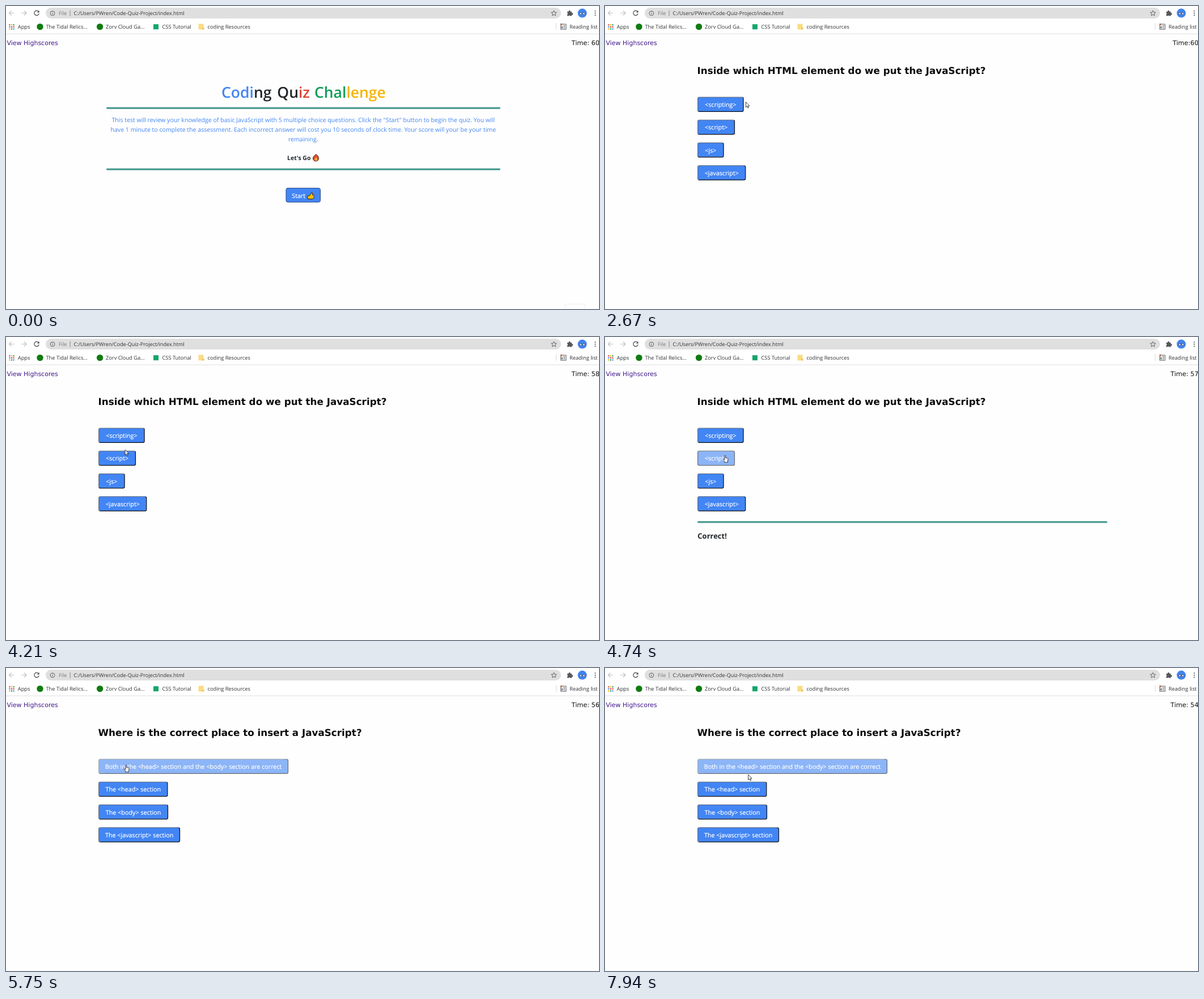
Animation of 1046x535 px, one loop 8000 ms. Source, as an HTML page:

```html
<!DOCTYPE html>
<html lang="en">
<head>
<meta charset="utf-8">
<title>Coding Quiz Challenge</title>
<style>
  html, body { margin: 0; width: 100%; height: 100%; overflow: hidden; background: #fff; }
  svg { display: block; width: 100%; height: 100%; }
  text { font-family: "Open Sans", "Noto Sans", sans-serif; text-rendering: geometricPrecision; white-space: pre; }
  .bar text { font-size: 9.25px; fill: #303236; }
  .bar .url { font-size: 9.1px; }
  .v text, text.v { font-family: "DejaVu Sans", sans-serif; }
  .mid { text-anchor: middle; }
  .intro { font-size: 10.6px; fill: #4285f4; }
  .label { font-size: 10.77px; fill: #fff; stroke: #fff; stroke-width: 0.2; text-anchor: middle; }
  .icon { fill: none; stroke: #5f6368; stroke-width: 1.2; }
</style>
</head>
<body>
<svg id="stage" viewBox="0 0 1046 535" preserveAspectRatio="none"></svg>
<script>
const LOOP = 8000;
const stage = document.getElementById('stage');

const esc = s => s.replace(/&/g, '&amp;').replace(/</g, '&lt;').replace(/>/g, '&gt;');
const text = (x, y, s, attrs = '') => `<text x="${x}" y="${y}" ${attrs}>${esc(s)}</text>`;
const rect = (x, y, w, h, attrs) => `<rect x="${x}" y="${y}" width="${w}" height="${h}" ${attrs}/>`;
const circle = (x, y, r, attrs) => `<circle cx="${x}" cy="${y}" r="${r}" ${attrs}/>`;
const path = (d, attrs) => `<path d="${d}" ${attrs}/>`;
const rule = (x, y, w) => rect(x, y, w, 2, 'rx="0.8" fill="#4fb8ab" stroke="#28756e" stroke-width="0.9"');

const appDots = () => {
  const tint = ['#db4437', '#4285f4', '#0f9d58', '#f4b400'];
  let out = '';
  for (let i = 0; i < 9; i++)
    out += rect(5.3 + i % 3 * 3.6, 32.2 + Math.floor(i / 3) * 3.6, 2.2, 2.2, `fill="${tint[(i * 3 + (i > 4)) % 4]}"`);
  return out;
};

const starPoints = (cx, cy, r) => Array.from({ length: 10 }, (_, i) => {
  const a = i * Math.PI / 5, d = i % 2 ? r * 0.45 : r;
  return (cx + d * Math.sin(a)).toFixed(2) + ',' + (cy - d * Math.cos(a)).toFixed(2);
}).join(' ');

const browser = `<g class="bar">
  ${rect(0, 0, 1046, 49, 'fill="#fff"')}
  ${rect(70, 3, 909, 19, 'rx="9.5" fill="#dfdfdf"')}
  ${path('M14.5 12.5H5.5M9.5 8.5L5.5 12.5L9.5 16.5M27 12.5H36M32 8.5L36 12.5L32 16.5', 'class="icon" style="stroke:#bfc1c4"')}
  ${path('M57.3 9.6A4.2 4.2 0 1 0 58.2 13.4', 'class="icon" style="stroke:#45484c"')}
  ${path('M58.6 7.8V11.6H54.8Z', 'fill="#45484c"')}
  ${circle(82, 12.8, 4, 'class="icon" style="stroke-width:1"')}
  ${path('M82 12.2V15M82 10.3V11.3', 'class="icon" style="stroke-width:1"')}
  ${text(93, 16, 'File', 'class="url" style="fill:#77797d"')}
  ${rect(112.6, 7.5, 1, 10.5, 'fill="#8a8c90"')}
  ${text(119.5, 16, 'C:/Users/PWren/Code-Quiz-Project/index.html', 'class="url"')}
  <polygon points="${starPoints(966.5, 12.9, 5)}" class="icon" style="stroke-width:1"/>
  ${path('M990 10H992.4A1.7 1.7 0 1 1 995.6 10H998V12.4A1.7 1.7 0 1 1 998 15.6V17.6H995.2A1.6 1.6 0 0 0 992.4 17.6H990V14.9A1.6 1.6 0 0 0 990 12Z', 'fill="#55585c"')}
  ${circle(1016.5, 12.6, 8, 'fill="#4384ee"')}
  ${[1013.8, 1019.2].map(x => circle(x, 13.4, 1.9, 'fill="#e4ebf8" stroke="#26365c" stroke-width="0.8"')).join('')}
  ${[9, 12.7, 16.4].map(y => circle(1039.4, y, 1.1, 'fill="#5f6368"')).join('')}
  ${appDots()}
  ${text(20.8, 40, 'Apps')}
  ${circle(60, 36.6, 5.7, 'fill="#107c10"')}${text(70.5, 40, 'The Tidal Relics...')}
  ${circle(165.6, 36.6, 5.7, 'fill="#107c10"')}${text(176, 40, 'Zorv Cloud Ga...')}
  ${rect(260, 32.2, 9, 9, 'fill="#16a56c"')}${text(275.5, 40, 'CSS Tutorial')}
  ${path('M339.5 31.5H348.5V41.5H339.5Z', 'fill="#fadc83"')}${path('M346.5 38H349.5V41.5H346.5Z', 'fill="#ecc35c"')}
  ${text(355.5, 40, 'coding Resources')}
  ${rect(970, 30, 1, 12, 'fill="#dcdcdc"')}
  ${path('M978.5 32H988V41.3H978.5ZM983 34.3H986.5M983 36.7H986.5M983 39.1H986.5', 'class="icon" style="stroke-width:1"')}
  ${rect(977.8, 30.9, 3.4, 3.4, 'fill="#c0775f"')}${rect(979.8, 35.8, 2, 4, 'fill="#5f6368"')}
  ${text(994, 40, 'Reading list')}
  ${rect(0, 48.6, 1046, 1, 'fill="#dedfe1"')}
</g>`;

const heading = [
  [380, [['Codi', '#4285f4'], ['ng', '#212529']]],
  [478.3, [['Qu', '#212529'], ['iz', '#db4437']]],
  [544, [['Chal', '#0f9d58'], ['lenge', '#f4b400']]]
].map(([x, parts]) => `<text x="${x}" y="161.7" font-size="26.5" font-weight="600">` +
  parts.map(([s, c]) => `<tspan fill="${c}">${s}</tspan>`).join('') + '</text>').join('');

const flame = path('M546.6 261.8C549.2 263.2 551.7 266 551.4 269.4C551.1 272.4 549 274 546.5 274C543.6 274 541.6 271.9 541.6 269C541.6 267 542.6 265.2 543.8 264.4C544.6 263.8 546 263.2 546.6 261.8Z',
    'fill="#e2522a" stroke="#3a1c14" stroke-width="1"') +
  path('M546.8 267C548.4 268.4 549.4 269.6 549.2 271.2C549 272.7 547.9 273.4 546.6 273.4C545 273.4 544 272.3 544.2 270.8C544.4 269.3 546.4 268.6 546.8 267Z', 'fill="#f7a63a"');

const thumb = path('M532 335H535.2L538.2 331.2L538.8 329.2C539.4 328.6 540.7 329.2 540.7 330.6L540.2 333.6H542.4C543.6 333.8 543.8 335 543.2 335.8C543.7 336.6 543.4 337.5 542.8 337.9C543 338.8 542.6 339.4 542 339.6C541.8 340.4 541.2 340.8 540.4 340.8H532Z',
  'fill="#fbbd10" stroke="#2a2210" stroke-width="1" stroke-linejoin="round"');

const welcome = `<g id="welcome">
  ${heading}
  ${rule(177.5, 179.2, 694)}
  <g class="intro mid">
  ${text(524.3, 205.3, 'This test will review your knowledge of basic JavaScript with 5 multiple choice questions. Click the "Start" button to begin the quiz. You will')}
  ${text(524.3, 221.9, 'have 1 minute to complete the assessment. Each incorrect answer will cost you 10 seconds of clock time. Your score will your be your time')}
  ${text(524.3, 238.6, 'remaining.')}
  </g>
  ${text(496, 271.8, "Let's Go", 'font-size="10.5" font-weight="700" fill="#212529"')}
  ${flame}
  ${rule(177.5, 287.3, 694)}
  ${rect(494, 321.5, 60.5, 24.8, 'rx="3" fill="#4285f4" stroke="#2f4a80"')}
  ${text(516.2, 338.6, 'Start', 'class="label"')}
  ${thumb}
</g>`;

const quiz = [
  { ask: 'Inside which HTML element do we put the JavaScript?',
    choices: [['<scripting>', 81.6], ['<script>', 66], ['<js>', 46.6], ['<javascript>', 85.3]] },
  { ask: 'Where is the correct place to insert a JavaScript?',
    choices: [['Both in the <head> section and the <body> section are correct', 335],
      ['The <head> section', 122.4], ['The <body> section', 123], ['The <javascript> section', 144]] }
];
const LEFT = 163.1, HIGH = 26.5, topOf = i => 160.4 + i * 40.25;

const choice = ([s, w], i) => `<g class="choice">
  ${rect(LEFT + 0.6, topOf(i) + 0.6, w - 1.2, HIGH - 1.2, 'rx="2.6" fill="#4285f4" stroke="url(#bevel)" stroke-width="1.2"')}
  ${text(LEFT + w / 2, topOf(i) + 17.6, s, 'class="label"')}</g>`;

const question = (q, i) => `<g id="q${i}">
  ${text(162.6, 119.8, q.ask, 'class="v" font-size="16.8" font-weight="700" fill="#0a0a0a"')}
  ${q.choices.map(choice).join('')}</g>`;

stage.innerHTML = `
  <defs><linearGradient id="bevel" x1="0" y1="0" x2="1" y2="1">
    <stop offset="0.5" stop-color="#666c78"/><stop offset="0.5" stop-color="#0c0f18"/>
  </linearGradient></defs>
  ${rect(0, 0, 1046, 535, 'fill="#fefefe"')}
  ${browser}
  <g class="v">
    ${text(1.5, 69.4, 'View Highscores', 'font-size="11" fill="#43198a"')}
    ${text(1047, 69.4, '', 'id="clock" font-size="11.3" fill="#111" text-anchor="end"')}
  </g>
  ${welcome}
  ${quiz.map(question).join('')}
  <g id="verdict">
    ${rule(163.6, 325.8, 722)}
    ${text(163.3, 355.6, 'Correct!', 'font-size="13" font-weight="700" fill="#212529"')}
  </g>
  ${rect(985.5, 526.5, 36, 12, 'id="panel" fill="#fdfdfd" stroke="#f1f1f1"')}
  ${circle(0, 0, 8, 'id="click" fill="#dede40" fill-opacity="0.58"')}
  <g id="cursor" stroke="#26282c" stroke-width="0.9" stroke-linejoin="round" fill="#fff">
    ${path('M0 0V9.3L2.1 7.4L3.5 10.6L5 9.9L3.6 6.8H6.5Z', 'id="arrow"')}
    ${path('M-1 1C-1 -0.2 0.8 -0.2 0.8 1V4.4L4.2 5C5 5.2 5.2 5.8 5.1 6.6L4.4 10V12.3H-1.2V10.8L-3.5 7.6C-3.9 6.8 -2.8 6.2 -2.1 6.9L-1 8Z', 'id="hand"')}
  </g>`;

const $ = id => document.getElementById(id);
const choices = quiz.map((_, i) => [...$('q' + i).querySelectorAll('.choice')]);
const show = (node, on) => node.setAttribute('visibility', on ? 'visible' : 'hidden');

const START = 1740, ANSWER = 4540, NEXT = 5530;

// Pointer path: time, x, y
const track = [
  [250, 930, 500], [380, 703, 361], [710, 703, 361], [840, 643, 377], [1000, 602, 397],
  [1200, 570, 372], [1410, 550, 335.5], [2150, 550, 335.5], [2400, 301, 166], [2550, 301, 166],
  [2670, 248.5, 169.5], [2930, 215, 171], [3690, 215, 171], [4210, 210, 199], [4420, 212, 209],
  [5000, 212, 209], [5390, 212, 171.3], [6630, 212, 171.3], [6750, 211.5, 171.3],
  [6900, 211.5, 171.3], [7740, 243.5, 180.5], [7940, 252.7, 188.3]
];

function pointer(t) {
  const k = track.findIndex(p => p[0] > t);
  if (k < 0) return track[track.length - 1].slice(1);
  if (k === 0) return track[0].slice(1);
  const [t0, x0, y0] = track[k - 1], [t1, x1, y1] = track[k], u = (t - t0) / (t1 - t0);
  return [x0 + (x1 - x0) * u, y0 + (y1 - y0) * u];
}

const pageAt = t => t < START ? -1 : t < NEXT ? 0 : 1;

// Index of the choice under the pointer, or -1
function hit([x, y], page) {
  return quiz[page].choices.findIndex(([, w], i) =>
    x > LEFT && x < LEFT + w && y > topOf(i) && y < topOf(i) + HIGH);
}

function draw(t) {
  const page = pageAt(t), [x, y] = pointer(t);
  show($('welcome'), page < 0);
  show($('q0'), page === 0);
  show($('q1'), page === 1);
  show($('verdict'), t >= ANSWER && t < NEXT);
  show($('panel'), t < 250);

  const ticks = Math.max(0, Math.floor((t - START) / 1000));
  const started = t >= START && ticks === 0;
  $('clock').textContent = 'Time:' + (started ? '' : ' ') + (60 - ticks);

  let onButton = x > 494 && x < 555 && y > 321 && y < 347;
  if (page >= 0) {
    onButton = hit([x, y], page) >= 0;
    const lit = hit(pointer(t - 70), page);
    choices[page].forEach((g, i) => {
      const focused = page === 0 && i === 1 && t >= ANSWER;
      g.setAttribute('opacity', i === lit ? 0.6 : 1);
      g.firstElementChild.setAttribute('stroke', focused ? '#0c0f18' : 'url(#bevel)');
    });
  }

  const moved = `translate(${x.toFixed(2)} ${y.toFixed(2)})`;
  $('cursor').setAttribute('transform', moved);
  $('click').setAttribute('transform', moved);
  show($('click'), (t >= START - 60 && t < START) || (t >= ANSWER - 70 && t < ANSWER));
  show($('arrow'), t >= 250 && !onButton);
  show($('hand'), t >= 250 && onButton);
}

const began = performance.now();
function frame() {
  draw((performance.now() - began) % LOOP);
  requestAnimationFrame(frame);
}
draw(0);
requestAnimationFrame(frame);
</script>
</body>
</html>
```
